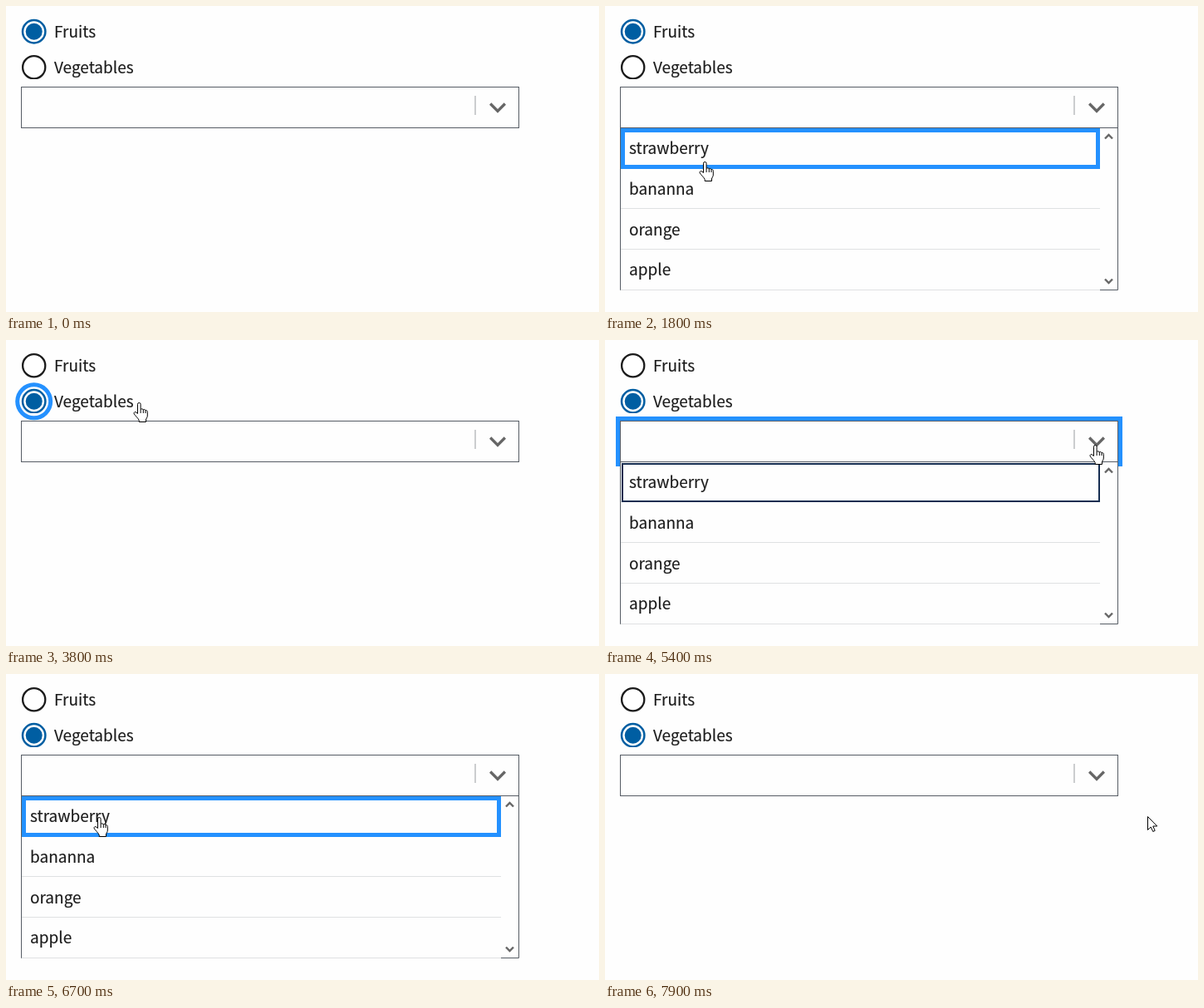
Write an HTML page that moves like this. It is 714x368 px and loops after 8 s.

```html
<!DOCTYPE html>
<html lang="en">
<head>
<meta charset="utf-8">
<title>Combo box</title>
<style>
  html, body { margin: 0; width: 100%; height: 100%; overflow: hidden; background: #fefefe; }
  svg { display: block; width: 714px; height: 368px; }
  text {
    font: 19px "Noto Sans CJK JP", "Noto Sans CJK SC", "Noto Sans CJK", "Open Sans", sans-serif;
    fill: #1b1b1b; stroke: #1b1b1b; stroke-width: .15;
  }
  .paper { fill: #fefefe; }
  .line { fill: none; stroke: #565c65; }
  .focus { fill: none; stroke: #2491ff; stroke-width: 5; }
  .mark { fill: none; stroke: #666; stroke-width: 2.4; }
  .cursor { fill: #fff; stroke: #000; stroke-linejoin: round; }
</style>
</head>
<body>
<svg viewBox="0 0 714 368">
  <g id="radios"></g>
  <rect class="paper" x="28" y="88" width="12" height="1.2"/>

  <rect id="boxRing" class="focus" x="15.5" y="94.5" width="605" height="55"/>
  <rect class="line" x="18.5" y="97.5" width="599" height="49"/>
  <path d="M565 108V131" stroke="#bfc1c3" stroke-width="1.6"/>
  <path d="M16.6 8.6L12 13.2L7.4 8.6L6 10l6 6l6-6z" fill="#666" transform="translate(572 102) scale(1.667)"/>
  <rect id="buttonRing" class="focus" x="570.5" y="100.5" width="44" height="43" style="stroke:#73b3ff"/>
  <path id="caret" d="M29.5 109V136" stroke="#1b1b1b"/>

  <g id="list">
    <rect class="paper" x="18" y="147" width="600" height="195"/>
    <path class="line" d="M18.5 146V341.5H617.5V146M18 146.5H618"/>
    <path class="mark" d="M602 159.5L606.5 155L611 159.5M602 328.5L606.5 333L611 328.5"/>
    <g id="items"></g>
    <rect id="firstItem" x="21" y="149" width="574" height="45" fill="none" stroke="#162e51" stroke-width="2"/>
    <rect id="itemRing" class="focus" x="21.5" width="572" height="44"/>
  </g>

  <g id="hand" class="cursor">
    <path d="M5.5 13.5V2.3a1.8 1.8 0 0 1 3.6 0V8.5c.5-1 3-.9 3.2.5c.6-.8 2.5-.6 2.7.8c.8-.6 2.3-.2 2.3 1.6V16c0 2.5-1.8 3.5-1.8 5v2.5H7.2V21.5C6 19 2.5 16 1.2 13.8C.4 12 2.6 10.8 4 12.2z"/>
    <path d="M9.1 8.5v4.5M12.3 9v4M15 10v3" fill="none"/>
  </g>
  <path id="arrow" class="cursor" d="M.5 .5V16.5L4.2 13L6.8 18.5L9.2 17.4L6.8 12H11.8Z"/>
</svg>
<script>
const LOOP = 8000, STEP = 100;
const LIST_TOP = 147, ROW = 48.7;
const $ = id => document.getElementById(id);
const show = (el, on) => el.style.display = on ? '' : 'none';
const within = (t, from, to) => t >= from && t < to;
const smooth = k => k * k * (3 - 2 * k);

const radios = ['Fruits', 'Vegetables'].map((label, i) => {
  const y = 30.8 + i * 43;
  const circle = (r, style) => `<circle cx="33.7" cy="${y}" r="${r}" ${style}/>`;
  $('radios').insertAdjacentHTML('beforeend', `<g>
    ${circle(20, 'class="focus"')}
    <g>${circle(13.7, 'fill="#fff" stroke="#005ea2" stroke-width="2.5"')}${circle(10, 'fill="#005ea2"')}</g>
    ${circle(13.6, 'fill="#fff" stroke="#1b1b1b" stroke-width="2.3"')}
    <text x="58" y="${38 + i * 43}">${label}</text></g>`);
  const [ring, on, off] = $('radios').lastElementChild.children;
  return { ring, on, off };
});

['strawberry', 'bananna', 'orange', 'apple'].forEach((name, i) =>
  $('items').insertAdjacentHTML('beforeend', `
    <path d="M19 ${Math.floor(LIST_TOP + ROW * (i + 1) - .8) + .5}H596" stroke="#dfe1e2"/>
    <text x="29" y="${Math.round(178.3 + i * ROW)}">${name}</text>`));

// Each trip eases the pointer to its target; bow bends the path downwards.
const entry = { x: 308, y: 75, time: 400 };
const trips = [
  { from: 400, to: 900, x: 599, y: 137, bow: -25 },
  { from: 1400, to: 1800, x: 121, y: 187, bow: 110 },
  { from: 1900, to: 2100, x: 102, y: 177 },
  { from: 2300, to: 3000, x: 88, y: 32 },
  { from: 3300, to: 3800, x: 161, y: 75 },
  { from: 3800, to: 4100, x: 555, y: 126, bow: -30 },
  { from: 4300, to: 4700, x: 591, y: 126 },
  { from: 5500, to: 6300, x: 121, y: 184, bow: 120 },
  { from: 6400, to: 6700, x: 113, y: 172 },
  { from: 6700, to: 7300, x: 664, y: 198, bow: 80 },
  { from: 7300, to: 7500, x: 690, y: 203 },
  { from: 7800, to: 7900, x: 653, y: 171 }
];
const openings = [{ from: 1200, to: 2900 }, { from: 4900, to: 7700 }];

function pointerAt(t) {
  let { x, y } = entry;
  for (const trip of trips) {
    if (t < trip.from) break;
    const k = smooth(Math.min(1, (t - trip.from) / (trip.to - trip.from)));
    x += (trip.x - x) * k;
    y += (trip.y - y) * k + (trip.bow || 0) * Math.sin(Math.PI * k);
  }
  return { x, y };
}

function itemUnder({ x, y }) {
  return within(x, 18, 596) && within(y, LIST_TOP, 341) ? Math.floor((y - LIST_TOP) / ROW) : -1;
}

function lastHovered(from, t) {
  for (let s = t; s >= from; s -= STEP) {
    const item = itemUnder(pointerAt(s));
    if (item >= 0) return item;
  }
  return -1;
}

// The text pointer over the field is not drawn.
function pointerKind(spot, open) {
  const { x, y } = spot;
  if (within(x, 18, 618) && within(y, 97, 147)) return x > 566 ? 'hand' : 'none';
  const onLabel = within(x, 18, 164) && within(y, 15, 89);
  return onLabel || open && itemUnder(spot) >= 0 ? 'hand' : 'arrow';
}

function render(time) {
  const t = Math.floor(time % LOOP / STEP) * STEP;
  const opening = openings.find(({ from, to }) => within(t, from, to));
  const active = opening ? lastHovered(opening.from, t) : -1;
  const typing = opening && active < 0;

  const checked = t < 3700 ? 0 : 1;
  radios.forEach((radio, i) => {
    show(radio.ring, i === checked && within(t, 2900, 4800));
    show(radio.on, i === checked);
    show(radio.off, i !== checked);
  });

  show($('list'), opening);
  show($('boxRing'), typing);
  show($('firstItem'), typing);
  show($('caret'), typing && (t - opening.from) % 1000 < 500);
  show($('buttonRing'), openings.some(({ from }) => within(t, from - STEP, from)));
  show($('itemRing'), active >= 0);
  $('itemRing').setAttribute('y', Math.round(LIST_TOP + Math.max(active, 0) * ROW) + 2.5);

  const spot = pointerAt(t);
  const kind = t < entry.time ? 'none' : pointerKind(spot, opening);
  for (const [id, dx] of [['hand', 8], ['arrow', 0]]) {
    show($(id), kind === id);
    $(id).setAttribute('transform', `translate(${Math.round(spot.x - dx)} ${Math.round(spot.y)})`);
  }
}

const start = performance.now();
(function tick() {
  render(performance.now() - start);
  requestAnimationFrame(tick);
})();
</script>
</body>
</html>
```
